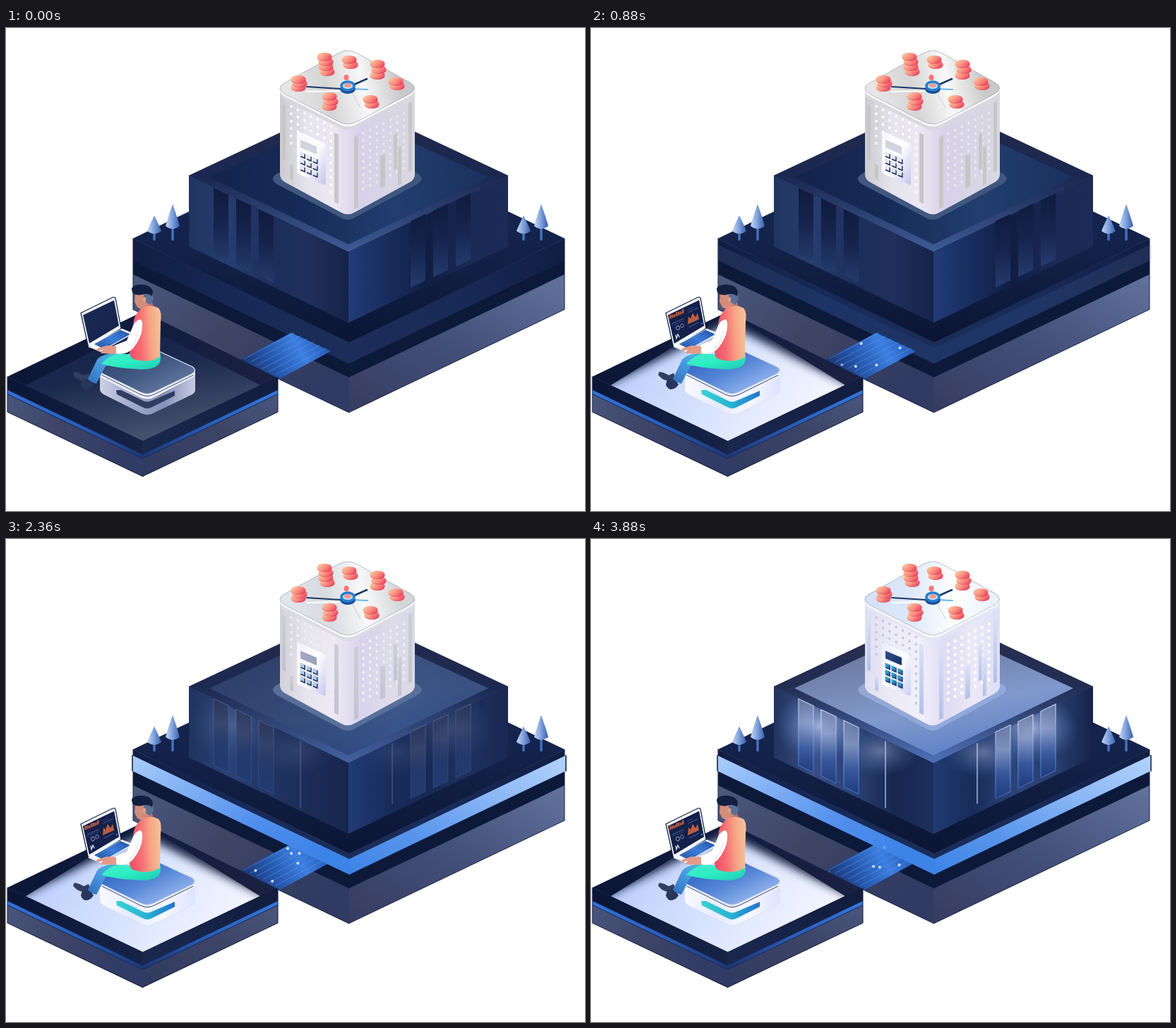
These frames come from a looping animation (820x683 px, 3920 ms). An HTML page:

```html
<!DOCTYPE html>
<html lang="en">
<head>
<meta charset="utf-8">
<style>
html, body { margin: 0; width: 100%; height: 100%; overflow: hidden; background: #fff; }
svg { display: block; width: 820px; height: 683px; }
</style>
</head>
<body>
<script>
const LOOP = 3920, S = .477;
let defs = '', ids = 0;

const stopList = colors => colors.map((c, i) =>
  `<stop offset="${i / (colors.length - 1)}" stop-color="${c}"/>`).join('');
const lin = (x1, y1, x2, y2, ...colors) => {
  const id = 'g' + ids++;
  defs += `<linearGradient id="${id}" x1="${x1}" y1="${y1}" x2="${x2}" y2="${y2}">${stopList(colors)}</linearGradient>`;
  return `url(#${id})`;
};
const rad = (...colors) => {
  const id = 'g' + ids++;
  defs += `<radialGradient id="${id}">${stopList(colors)}</radialGradient>`;
  return `url(#${id})`;
};
const range = (n, fn) => Array.from({ length: n }, (_, i) => fn(i)).join('');
const poly = (pts, fill, more = '') => `<polygon points="${pts}" fill="${fill}" ${more}/>`;
const path = (d, fill, more = '') => `<path d="${d}" fill="${fill}" ${more}/>`;
const line = (d, color, w = 1, more = '') => path(d, 'none', `stroke="${color}" stroke-width="${w}" stroke-linecap="round" ${more}`);
const oval = (x, y, rx, ry, fill, more = '') => `<ellipse cx="${x}" cy="${y}" rx="${rx}" ry="${ry}" fill="${fill}" ${more}/>`;
const slab = (x, w, y, h, slope, fill, more) =>
  poly(`${x},${y} ${x + w},${y + slope * w} ${x + w},${y + slope * w + h} ${x},${y + h}`, fill, more);
// Two isometric faces meeting at the front corner, overlapping slightly to hide the seam
const wedge = (x, half, y, h, left, right = left) =>
  slab(x, half + .7, y, h, S, left) + slab(x + half, half, y + S * half, h, -S, right);
const lit = (name, ...parts) => `<g class="${name}">${parts.join('')}</g>`;

function base() {
  return wedge(180, 305.5, 348, 50, lin(0, 0, 1, .6, '#4c587f', '#3e4463', '#303a62'), lin(0, 1, 1, 0, '#373b60', '#43507a', '#62739c')) +
    wedge(180, 305.5, 298, 50.5, '#0d1939') +
    wedge(180, 305.5, 298, 31, lin(0, 0, 1, 0, '#111e42', '#172a57', '#1c2d59'), lin(0, 0, 1, 0, '#1c2d59', '#182a57', '#111e42')) +
    poly('180,298 486,152 791,298 486,444.5', lin(0, 0, 0, 1, '#162650', '#14234b', '#0b1533')) +
    line('M180 298V398L485.5 543.7L791 398V298L711 260M180 298L259 260', '#16224a', 1);
}

function bridge() {
  return poly('332,469 404,431 460,457 386,497', lin(0, .6, 1, .3, '#1b3470', '#2658ae', '#3c7fe0', '#2558b4')) +
    range(6, i => {
      const x = 337 + i * 9, y = 468 + i * 4.4;
      return line(`M${x} ${y}l71 -37`, '#5d9bf0', .8, 'opacity=".65"');
    });
}

function band() {
  return wedge(179, 307, 306, 22, lin(0, 0, 1, .6, '#a9cdfb', '#7dadf3', '#4f8eec', '#3c83e6'),
    lin(0, 1, 1, 0, '#3c83e6', '#5a97ec', '#8cb8f6', '#b3d3fc')) +
    line('M179 306V328M793 306V328', '#0d1939', 1.5);
}

const windows = [
  ...[294, 326, 358].map(x => [x, 226 + (x - 294) * S, S]),
  ...[573, 605, 637].map(x => [x, 273 - (x - 573) * .46, -S])
];
const eachWindow = (fill, more) => windows.map(([x, y, s]) => slab(x, 21, y, 94, s, fill, more)).join('');

function building() {
  const wallL = lin(0, 0, 1, 0, '#20345f', '#263d70', '#1d2e5b', '#202f5b', '#152347');
  const wallR = lin(0, 0, 1, 0, '#213c78', '#182c5c', '#111e43', '#1a2a55', '#1b2b55');
  const edge = lin(0, 0, 0, 1, '#e9f0ff', '#7fa8ee', '#3d70cc');
  const pane = lin(0, 0, 0, 1, '#7584ad', '#93a4cd', '#3c5fa8', '#1c3a7c');
  const glow = rad('#a3b3db', '#7088bb99', '#4a6cae00');
  const roof = '288,211 485,120 683,211 485,306';
  return poly('259,209 485,103 711,209 485,317', lin(0, 0, 0, 1, '#25294a', '#1a2850', '#3f5c97'), 'stroke="#1a2448" stroke-width="1"') +
    poly(roof, lin(0, .5, 1, .5, '#13234b', '#172b58', '#223d6e', '#1b315f')) +
    wedge(259, 226, 209, 100, wallL, wallR) +
    eachWindow(lin(0, 0, 0, 1, '#101b3d', '#16254e', '#243b6c')) +
    lit('tower',
      poly('259,209 485,103 711,209 485,317', lin(0, 0, 0, 1, '#2b3152', '#222d52', '#4f72b8')) +
      poly(roof, lin(.2, 0, .6, 1, '#626f92', '#7283ac', '#8199cc', '#5d81c6')) +
      wedge(259, 226, 209, 100, lin(0, 0, 1, 0, '#22345f', '#384d80', '#2b4378', '#17264e', '#1c2f5c'),
        lin(0, 0, 1, 0, '#213a72', '#182c5a', '#2b4378', '#2b4071', '#15234a')) +
      `<g clip-path="url(#walls)">` +
      oval(325, 264, 64, 52, glow) + oval(410, 300, 55, 36, glow, 'opacity=".5"') +
      oval(625, 268, 66, 48, glow, 'opacity=".9"') + oval(555, 302, 55, 36, glow, 'opacity=".5"') + '</g>' +
      eachWindow(pane, `opacity=".75" stroke="${edge}" stroke-width="1.3"`) +
      line('M417 286V380M547 289V374', '#c6d6fa', 1.2));
}

const bars = [[391, 5, 107, 78, S], [402, 5, 192, 21, S], [465, 6, 148, 98, S], [493, 6, 154, 102, -S],
  [530, 7, 181, 46, -S], [549, 5, 151, 50, -S], [555, 5, 169, 54, -S], [570, 5, 106, 98, -S]];
const body = 'M388 88V207Q388 214 395 218L473 260Q484 267 495 260L572 218Q579 214 579 207V88L484 139Z';
const lid = 'M394 78L470 36Q484 28 498 36L572 77Q585 85 572 93L498 132Q484 140 470 132L394 93Q382 85 394 78Z';

function cubeShell(sides, top, rim, bar, dotL, dotR) {
  return path(body, sides) +
    range(7, i => range(i === 0 || i === 6 ? 10 : 4, j =>
      i === 0 && j > 5 ? '' : oval(404 + i * 9.4, 111 + i * 4.6 + j * 10.4, 1.7, 2.1, dotL))) +
    range(7, i => range(9, j => oval(506 + i * 9.6, 149 - i * 4.8 + j * 9.8, 1.9, 2.3, dotR))) +
    bars.map(([x, w, y, h, s]) => slab(x, w, y, h, s, bar)).join('') +
    path(lid, rim, 'transform="translate(0 8)"') + path(lid, '#ffffff', 'transform="translate(0 3)"') + path(lid, top);
}

function calculator(panel, screen, key, shade) {
  return path('M414 146L449 162Q453 164 453 169V219Q453 223 449 221L416 207Q412 205 412 201V149Q412 145 414 146Z', panel) +
    slab(417, 23, 158, 11, .42, screen) +
    range(3, r => range(3, c => {
      const x = 417 + c * 8.8, y = 175.5 + r * 9.5 + c * 3.8;
      return slab(x, 7, y, 7, .42, shade) + slab(x - .5, 6, y - .5, 5.5, .42, key);
    }));
}

function cube() {
  const pad = 'M384 206L474 160Q484 155 494 160L582 205Q595 213 582 221L496 267Q484 275 472 267L384 221Q372 213 384 206Z';
  return path(pad, '#40587f') +
    lit('tower', path(pad, lin(0, 0, 1, 1, '#93a5cd', '#8fabe2'))) +
    cubeShell(lin(0, 0, 1, 0, '#cccbd0', '#e5e3eb', '#ebe8f1', '#d6d1e9', '#d8d5e5', '#d9d7e0'),
      lin(.1, .7, .9, .6, '#e6e6e7', '#d5d5d6', '#f8f8f8', '#c9c9ca'), '#d9d8df', '#c7c6c7', '#fff', '#e7e5ef') +
    calculator(lin(0, 0, 1, 1, '#f6f5fc', '#ffffff', '#c3c6ec'), '#d2d3de', '#e4e6f4', '#26345f') +
    lit('tower', cubeShell(lin(0, 0, 1, 0, '#dedff0', '#edeaf8', '#f2effc', '#dfdcf3', '#ebe8f8', '#dedff4'),
      lin(0, .5, 1, .5, '#d2e2f8', '#dce8f8', '#ffffff', '#e5effc'), '#e4e5f7',
      lin(0, 0, 0, 1, '#dce2f7', '#b2c0e7'), '#c7c8dc', '#fff'),
      calculator(lin(0, 0, 1, 1, '#e9eafa', '#ffffff', '#c8cff5'), lin(0, 0, 1, 1, '#304d91', '#183267'),
        lin(0, 0, 1, 1, '#42bbd2', '#286fb3'), '#203e78')) +
    path(lid, 'none', 'stroke="#48506e" stroke-width=".7" opacity=".5"');
}

// Coin stacks: x, y of the top coin, number of coins, spacing
const stacks = [[451, 40, 4, 7], [486, 44, 2, 7], [526, 50, 3, 8], [552, 75, 2, 6], [414, 72, 3, 5.5], [458, 96, 3, 7], [516, 100, 2, 7]];

function clock() {
  const coin = lin(0, .2, 1, .7, '#fbcca2', '#fa9682', '#f24861');
  const rim = lin(0, 0, 1, 0, '#f59b86', '#dc3858');
  return line('M426 90L474 89', '#fff', 2) + line('M489 89L502 113', '#b7c5d9', .8) +
    line('M492 86L512 87', '#68b8e9', 2) + line('M426 83L474 86', '#1b3867', 2) + line('M493 80L511 72', '#173668', 2.6) +
    oval(482, 70, 3.5, 4, '#f87576') + oval(484, 86, 11, 7, '#1a4d99') +
    oval(484, 82, 9, 6, '#bcdcf5', 'stroke="#257fcd" stroke-width="3.5"') + oval(484, 81, 5, 3, '#f4988b') +
    stacks.map(([x, y, n, step]) => range(n, i => {
      const k = n - 1 - i, cx = x + k % 2 * 2 + (n === 4 && k > 1 ? 2 : 0), cy = y + k * step;
      return oval(cx, cy + 1.5, 10.5, 5.5, rim) + oval(cx, cy, 10.5, 5.2, coin);
    })).join('');
}

function trees() {
  const cone = lin(0, 0, 1, 0, '#c5d8f4', '#7c9fdc', '#365da9');
  return [[210, 265, 24], [236, 249, 33], [733, 265, 24], [758, 249, 33]].map(([x, y, h]) =>
    line(`M${x} ${y + h}V299`, '#4471bd', 3.5) +
    path(`M${x} ${y}Q${x + 7} ${y + h * .6} ${x + 10} ${y + h - 2}Q${x} ${y + h + 6} ${x - 10} ${y + h - 2}Q${x - 7} ${y + h * .6} ${x} ${y}Z`, cone)).join('');
}

function platform() {
  const floor = '28,505 194,421 360,505 194,584';
  const stripe = lin(0, 0, 1, 0, '#3173db', '#2860bd', '#1c3775');
  const stripeR = lin(0, 0, 1, 0, '#1c3775', '#275fbb', '#3478df');
  return poly('2,493 194,401 385,495 194,586', lin(0, 0, 1, 0, '#0c1736', '#111c3f', '#1b2141')) +
    poly(floor, lin(0, 0, .4, 1, '#111e42', '#1b294e', '#46506f')) +
    lit('desk', '<g clip-path="url(#well)">',
      poly('-6,520 194,419 394,520 194,640', lin(0, .3, 1, .6, '#b3c8fb', '#cfdcfd', '#e8eeff', '#fbfcff'), 'filter="url(#soft)"'),
      '</g>') +
    wedge(2, 191.5, 493, 50, lin(0, 0, 1, .3, '#4a577e', '#3d4467', '#303b66'), lin(0, 1, 1, 0, '#303960', '#3c4466', '#4c5a82')) +
    wedge(2, 191.5, 493, 25, '#162852') + wedge(2, 191.5, 512, 5, stripe, stripeR) +
    wedge(2, 191.5, 493, 18, lin(0, 0, 1, 0, '#0b1635', '#172347'), lin(0, 0, 1, 0, '#1b284e', '#111c3e')) +
    line('M2 493V543L193.5 634L385 543V495', '#101b3d', 1);
}

function seatParts(side, top, handle) {
  return path('M133 486V512Q134 516 140 519L190 544Q200 550 210 544L262 519Q268 516 268 512V486Z', side) +
    path('M137 479L190 454Q200 449 210 454L264 479Q271 484 264 489L210 517Q200 522 190 517L137 490Q129 484 137 479Z', '#f5f6ff', 'transform="translate(0 5)"') +
    path('M137 479L190 454Q200 449 210 454L264 479Q271 484 264 489L210 515Q200 520 190 515L137 489Q129 484 137 479Z', top, 'stroke="#dfe5f8" stroke-width="1.2"') +
    line('M136 491L190 518Q200 523 210 518L265 491', '#273d72', 1) +
    path('M156 512H163L194 527Q200 530 206 527L239 513V520L207 536Q200 540 193 536L157 518Z', handle);
}

function seat() {
  return seatParts(lin(0, 0, 1, 0, '#cbd0e5', '#a2aacd', '#8591ba', '#c7cbe0'), lin(0, 0, 1, 1, '#283a65', '#435a83', '#7286ad'), '#303c60') +
    lit('desk', seatParts(lin(0, 0, 1, 0, '#f9faff', '#e6eaff', '#f7f8ff', '#dce3ff'),
      lin(0, 0, 1, 1, '#2056b9', '#5586d6', '#b9d0fb'), lin(0, 0, 1, 0, '#35d3d2', '#27b4d2', '#2573ce')));
}

function laptop() {
  return path('M106 403L151 381Q154 380 155 382L163 425L117 453Z', '#fff', 'stroke="#14264f" stroke-width="1.3"') +
    poly('109,406 153,385 160,421 118,446', lin(0, 0, 1, 1, '#1b2c54', '#13224a')) +
    lit('desk', poly('109,406 153,385 160,421 118,446', '#14204a'),
      range(7, i => slab(111 + i * 3, 2.6, 406 - i * 1.3 + i % 3, 6 - i % 3, -.45, '#b0573f')),
      poly('137,419 138,408 141,411 144,403 148,409 151,403 153,412', '#b95f42'),
      line('M115 418l16 -7M138 402l13 -6M139 423l14 -7', '#4d6390', 1),
      line('M114 421l17 -7M136 399l9 -4', '#34518e', .8),
      oval(123, 424, 2.5, 3, 'none', 'stroke="#92a1c5" stroke-width="1"') +
      oval(129, 421, 2.2, 2.7, 'none', 'stroke="#7488b5" stroke-width="1"'),
      line('M120 434l1 5l2 -6l2 4', '#f0f4ff', 1.2), oval(157, 418, 1.2, 1.2, '#3a7ae2')) +
    poly('117,451 164,425 181,432 134,458', '#f4f5ff') +
    poly('125,447 162,427 176,433 139,454', lin(0, 1, 1, 0, '#1e4893', '#3578d5', '#1c4b9e')) +
    range(4, i => line(`M${128 + i * 4} ${448 + i * 1.7}L${161 + i * 4} ${430 + i * 1.5}`, '#6b9eec', .6, 'stroke-dasharray="3 1.5"'));
}

function person() {
  const skin = '#e39b87';
  return path('M97 486Q104 487 110 491L117 488L120 496Q112 500 105 498Q98 495 95 490Z', '#303e62') +
    path('M108 497Q115 495 120 498L124 504Q120 511 112 511Q107 509 106 504Z', '#27365c') +
    path('M160 459Q136 460 129 469L116 496Q120 501 128 503L141 478L179 473Z', lin(0, 1, 1, 0, '#3070bd', '#4b9de2', '#32d4c6')) +
    path('M179 462L218 459Q221 471 215 477Q204 485 181 482Q158 481 135 475Q143 465 159 460Z', lin(0, 0, 1, 1, '#4bead1', '#2ceec2', '#20c7b5')) +
    path('M188 389L207 388L210 399L192 405Z', '#bb7472') +
    path('M183 376L199 373L208 382Q207 391 197 393Q194 400 186 395L182 387Z', '#d48c7b') +
    path('M195 376H208Q211 386 204 391Q198 389 195 384Z', '#596f94') +
    oval(196, 384, 2.3, 3.5, skin) +
    path('M179 374Q176 366 183 364Q193 361 202 365Q210 369 207 379Q200 374 193 377Q184 379 179 374Z', '#121f40') +
    path('M194 395Q205 390 216 396Q221 401 219 416L218 465Q202 475 180 468Q173 464 176 451L181 413Q184 402 194 395Z',
      lin(0, .5, 1, .4, '#ef5069', '#f76c72', '#f7a486', '#f3c39b')) +
    path('M190 412Q182 413 178 426L171 442L153 449L155 460Q171 463 180 453Q192 438 193 424Q194 413 190 412Z', '#fff') +
    path('M187 429Q184 445 174 456', 'none', 'stroke="#dbe0f2" stroke-width="1"') +
    path('M156 450L143 449L130 453Q126 455 130 457L137 455L134 460L156 461Z', skin);
}

// Signals on the bridge: lane, direction, start time, speed per ms
const signals = [[.07, -1, 210], [.07, -1, 2090], [.7, -1, 690], [.82, 1, 120, .00047], [.35, 1, 790],
  [.58, 1, 477, .00035], [.25, -1, 1970], [.2, 1, 2110], [.54, 1, 2950], [.64, 1, 2870], [.85, 1, 2480]];

const scene = base() + building() + cube() + clock() + trees() + bridge() + lit('band', band()) +
  signals.map(() => '<circle class="signal" r="2" fill="#c9e2ff"/>').join('') +
  platform() + seat() + laptop() + person();
document.body.innerHTML = `<svg viewBox="0 0 820 683"><defs>${defs}
  <clipPath id="walls"><path d="M259 209L485 317L711 209V309L485 417L259 309Z"/></clipPath>
  <clipPath id="well"><path d="M28 505L194 403L360 505L194 584Z"/></clipPath>
  <filter id="soft"><feGaussianBlur stdDeviation="7"/></filter></defs>${scene}</svg>`;

const fades = [['desk', 160, 760], ['band', 800, 1700], ['tower', 2200, 2740]]
  .map(([name, from, to]) => ({ from, to, parts: document.querySelectorAll('.' + name) }));
const dots = document.querySelectorAll('.signal');

function draw(now) {
  const step = Math.floor(now % LOOP / 40) * 40, t = step < 160 ? 0 : step;
  for (const { from, to, parts } of fades) {
    const k = Math.min(1, Math.max(0, (t - from) / (to - from)));
    parts.forEach(p => p.setAttribute('opacity', k));
  }
  signals.forEach(([lane, dir, start, speed = .00055], i) => {
    const run = (t - start) * speed, u = dir > 0 ? run : 1 - run;
    dots[i].setAttribute('cx', 332 + u * 74 + lane * 56);
    dots[i].setAttribute('cy', 469 - u * 39 + lane * 26);
    dots[i].setAttribute('opacity', Math.max(0, Math.min(1, run * 12, (1 - run) * 12)));
  });
  requestAnimationFrame(draw);
}
requestAnimationFrame(draw);
</script>
</body>
</html>
```
